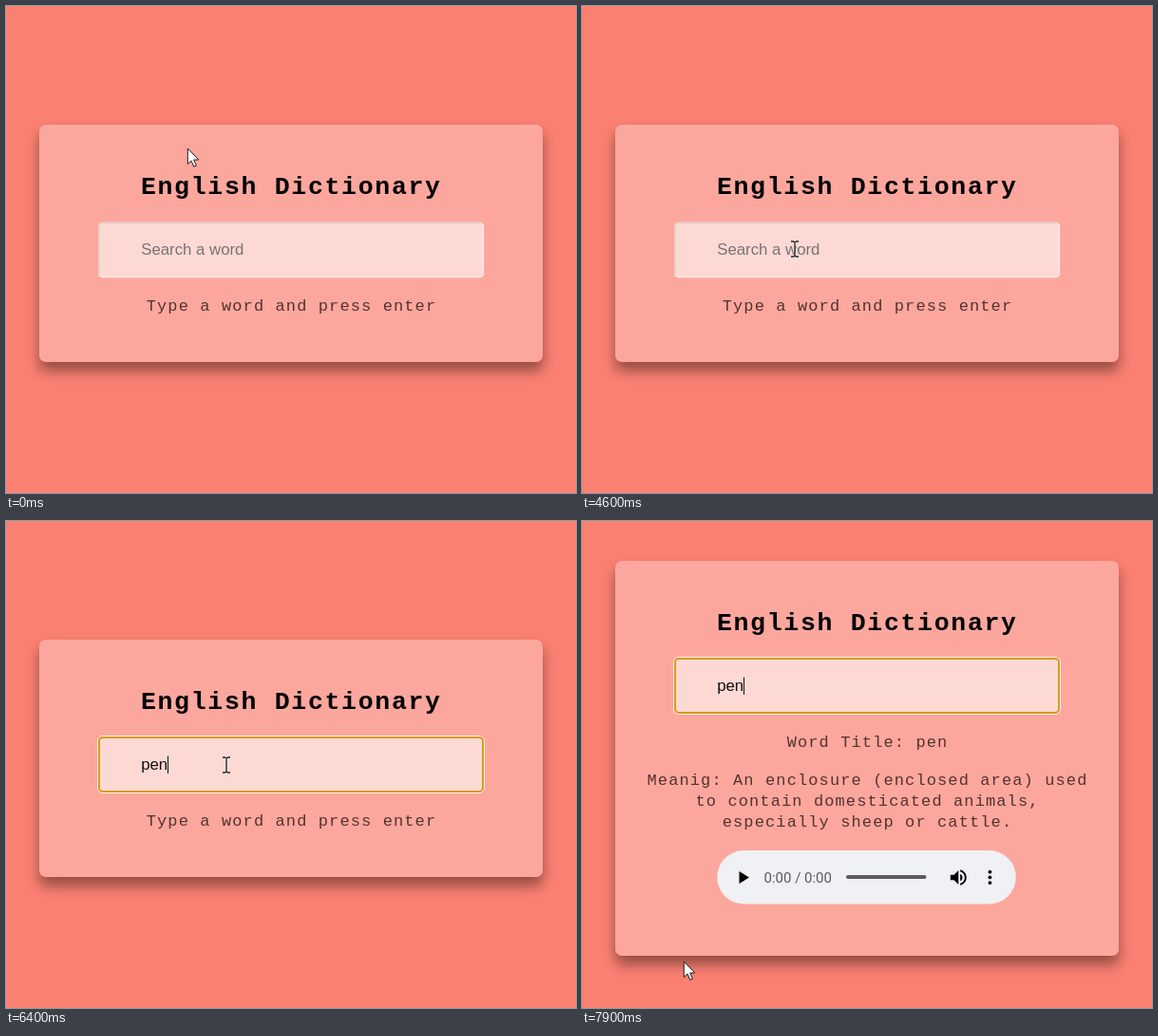
Recreate the animation shown at these times as an HTML page. Size 600x513 px, loop 8000 ms.

```html
<!DOCTYPE html>
<html lang="en">
<head>
<meta charset="utf-8">
<title>English Dictionary</title>
<style>
  html, body { margin: 0; width: 100%; height: 100%; overflow: hidden; background: #fa8072; }
  #card {
    position: absolute; left: 34.5px; width: 530px; top: 125px; height: 250px;
    border-radius: 7px; background: rgba(255, 255, 255, .3);
    box-shadow: 0 9.5px 14px rgba(0, 0, 0, .4);
  }
  svg { position: absolute; left: 0; top: 0; width: 600px; height: 513px; }
  .mono { font-family: "Courier New", "Liberation Mono", monospace; text-anchor: middle; white-space: pre; }
  .title { font-size: 26.5px; letter-spacing: .064em; font-weight: bold; }
  .info { font-size: 17px; letter-spacing: .0655em; fill: #53332f; }
  .field { font: 16.8px Arial, "Liberation Sans", sans-serif; }
  .time { font: 15px Roboto, sans-serif; fill: #5c5a5e; }
</style>
</head>
<body>
<div id="card"></div>
<svg viewBox="0 0 600 513">
  <defs>
    <path id="bar" d="M-4 -8H-1.5L0 -7L1.5 -8H4M0 -7V7M-4 8H-1.5L0 7L1.5 8H4"/>
  </defs>
  <g id="form">
    <text class="mono title" x="300.3" y="198">English Dictionary</text>
    <rect x="97" y="228" width="406" height="58" rx="4.5" fill="#fff" fill-opacity=".57"/>
    <g id="border" fill="none" stroke-width="1.5">
      <rect x="98" y="228.5" width="404.3" height="57" rx="4" stroke="#fdeae8"/>
      <path d="M98 284V232Q98 228.5 102 228.5H500" stroke="#e3cac8"/>
    </g>
    <g id="ring" fill="none">
      <rect x="96.5" y="226.5" width="407" height="60" rx="5.5" stroke="#fff3e6"/>
      <rect x="98" y="228" width="404" height="57" rx="4" stroke="#d99a1c" stroke-width="2"/>
    </g>
    <text id="value" class="field" x="142.2" y="262"></text>
    <path id="caret" d="M0 247.5V266" stroke="#111"/>
  </g>
  <text id="hint" class="mono info" x="300.5" y="321"></text>
  <g id="result">
    <g class="mono info">
      <text x="300.5" y="238">Word Title: pen</text>
      <text x="300.5" y="278.3">Meanig: An enclosure (enclosed area) used</text>
      <text x="300.5" y="300">to contain domesticated animals,</text>
      <text x="300.5" y="321.7">especially sheep or cattle.</text>
    </g>
    <rect x="142.3" y="347" width="314.5" height="56.4" rx="28.2" fill="#f0f1f4"/>
    <path d="M165.5 368.9V382L176 375.4Z"/>
    <text class="time" x="191.5" y="381">0:00 / 0:00</text>
    <rect id="track" x="278" y="373" width="84.5" height="3.9" rx="1.9"/>
    <path id="speaker" transform="translate(385 364.2) scale(.94)"
      d="M3 9v6h4l5 5V4L7 9H3zm13.5 3c0-1.8-1-3.3-2.5-4v8c1.5-.7 2.5-2.2 2.5-4zM14 3.2v2.1c2.9.9 5 3.5 5 6.7s-2.1 5.9-5 6.7v2.1c4-.9 7-4.5 7-8.8s-3-7.9-7-8.8z"/>
    <circle cx="429.4" cy="369.7" r="1.9"/>
    <circle cx="429.4" cy="375.4" r="1.9"/>
    <circle cx="429.4" cy="381.1" r="1.9"/>
  </g>
  <path id="arrow" d="M.3 1V17.5L4 14L6.7 20.3L9.4 19.2L6.7 13H11.8Z" fill="#fff" stroke="#222"/>
  <g id="beam" fill="none">
    <use href="#bar" stroke="#fff" stroke-opacity=".6" stroke-width="2.6"/>
    <use href="#bar" stroke="#222" stroke-width="1.4"/>
  </g>
</svg>
<script>
const LOOP = 8000;
const $ = id => document.getElementById(id);

// Each track lists [start in ms, value...]; values hold until the next step.
const pointer = [
  [0, 191, 149, 'arrow'], [100, 180, 143, 'arrow'], [200, 158, 140, 'arrow'], [300, 128, 160, 'arrow'],
  [400, 112, 195, 'arrow'], [500, 130, 238, 'beam'], [600, 172, 262, 'beam'], [700, 215, 260, 'beam'],
  [800, 238, 256, 'beam'], [1400, 230, 255, 'beam'], [1500, 212, 257, 'beam'], [1600, 224, 258, 'beam'],
  [4600, 224, 256, 'beam'], [5100, 230, 255, 'beam'], [5200, 240, 256, 'beam'], [5300, 232, 257, 'beam'],
  [7600, 225, 245, 'beam'], [7700, 218, 229, 'beam'], [7800, 158, 345, 'arrow'], [7900, 107, 463, 'arrow']
];
const focus = [[0, false], [1100, true], [1200, false], [4800, true]];
const caretOn = [[0, false], [1100, true], [1200, false], [4800, true], [5300, false], [5800, true], [6900, false], [7400, true]];
const typed = [[0, ''], [6100, 'p'], [6200, 'pe'], [6400, 'pen']];
const hints = [[0, 'Type a word and press enter'], [6800, 'Searching the meaning of "pen"'], [7100, '']];
const audioReady = [[0, false], [7300, true]];

const at = (track, t) => track.findLast(step => step[0] <= t).slice(1);
const show = (id, on) => { $(id).style.display = on ? '' : 'none'; };
const setText = (id, text) => { if ($(id).textContent !== text) $(id).textContent = text; };

function draw(t) {
  const [x, y, shape] = at(pointer, t);
  const [focused] = at(focus, t);
  const [word] = at(typed, t);
  const [ready] = at(audioReady, t);
  const found = t >= 7100;

  $('card').style.top = (found ? 42 : 125) + 'px';
  $('card').style.height = (found ? 416 : 250) + 'px';
  $('form').setAttribute('transform', `translate(0 ${found ? -83 : 0})`);
  show('result', found);
  setText('hint', at(hints, t)[0]);

  show('ring', focused);
  show('border', !focused);
  setText('value', word || 'Search a word');
  $('value').setAttribute('fill', word ? '#111' : '#7a7276');
  show('caret', at(caretOn, t)[0]);
  const caretX = word ? 142.2 + $('value').getComputedTextLength() : 142;
  $('caret').setAttribute('transform', `translate(${Math.round(caretX) + .5} 0)`);

  $('track').setAttribute('fill', ready ? '#5d5960' : '#bebbc0');
  $('speaker').setAttribute('fill', ready ? '#000' : '#a9a9ad');

  for (const id of ['arrow', 'beam']) {
    show(id, id === shape);
    $(id).setAttribute('transform', `translate(${x} ${y})`);
  }
}

const start = performance.now();
function tick(now) {
  draw(Math.max(0, now - start) % LOOP);
  requestAnimationFrame(tick);
}
draw(0);
requestAnimationFrame(tick);
</script>
</body>
</html>
```
